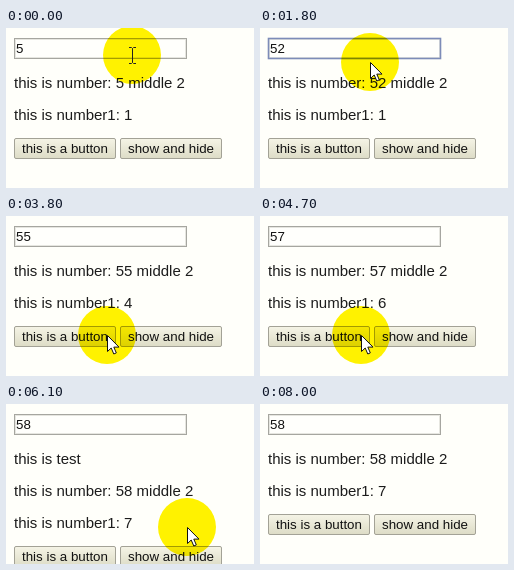
An HTML page for the animation above (8500 ms loop, 248 px wide and 160 px high).

```html
<!DOCTYPE html>
<html lang="en">
<head>
<meta charset="utf-8">
<title>Number demo</title>
<style>
html, body { margin: 0; width: 100%; height: 100%; overflow: hidden; background: #fffffa; }
svg { display: block; width: 248px; height: 160px; font-family: "Liberation Sans", Arial, sans-serif; }
.line { font-size: 15px; fill: #1c1c1c; }
.small { font-size: 13.33px; fill: #111; }
#halo { fill: #fff200; mix-blend-mode: multiply; }
</style>
</head>
<body>
<svg viewBox="0 0 248 160">
  <defs>
    <linearGradient id="face" x1="0" y1="0" x2="0" y2="1">
      <stop offset="0" stop-color="#f5f4e6"/>
      <stop offset="1" stop-color="#dddcc6"/>
    </linearGradient>
    <g id="box">
      <rect x=".5" y=".5" width="101" height="20" rx="1.5" fill="url(#face)" stroke="#a3a296"/>
    </g>
  </defs>
  <rect width="248" height="160" fill="#fffffa"/>

  <rect x="8.5" y="10.5" width="172" height="20" fill="#fffffc" stroke="#a6a6a0"/>
  <rect x="9.5" y="11.5" width="170" height="18" fill="none" stroke="#e6e6e0"/>
  <rect id="focus" x="8.5" y="10.5" width="172" height="20" fill="none" stroke="#7d8cb8" stroke-width="1.6"/>
  <text id="value" class="small" x="10" y="25"></text>
  <rect id="caret" y="13" width="1" height="15" fill="#111"/>

  <text id="test" class="line" x="8" y="60">this is test</text>
  <g id="flow">
    <text id="number" class="line" x="8" y="60"></text>
    <text id="number1" class="line" x="8" y="92"></text>
    <use href="#box" x="8" y="110"/>
    <text class="small" x="16" y="125">this is a button</text>
    <use href="#box" x="114" y="110"/>
    <text class="small" x="122" y="125">show and hide</text>
  </g>

  <g id="pointer">
    <circle id="halo" r="29"/>
    <path id="arrow" d="M.5.5V16.5L4.2 13 6.8 19 9.3 17.9 6.8 12.1H12Z" fill="#fff" stroke="#111"/>
    <path id="beam" d="M-3.5-7.5H-1L0-6.5 1-7.5H3.5M-3.5 8.5H-1L0 7.5 1 8.5H3.5M0-6.5V7.5" fill="none" stroke="#222"/>
  </g>
</svg>
<script>
const LOOP = 8500, STEP = 100;
const $ = id => document.getElementById(id);
const show = (id, on) => $(id).setAttribute("visibility", on ? "visible" : "hidden");
const shift = (id, x, y) => $(id).setAttribute("transform", `translate(${x} ${y})`);
const within = (t, a, b) => t >= a && t < b;

// Pointer stops: time, x, y
const path = [
  [0, 126, 27], [600, 113, 25], [1700, 113, 25], [1800, 110, 34],
  [2400, 101, 119], [5200, 101, 119], [5800, 181, 123],
  [6400, 181, 123], [7000, 183, 146], [7600, 183, 146], [8000, 183, 195]
];
const clicks = [2900, 3300, 3700, 4200, 4600, 5000];

function pointerAt(t) {
  const i = path.findIndex(p => p[0] > t);
  if (i < 0) return path[path.length - 1].slice(1);
  const [t0, x0, y0] = path[i - 1], [t1, x1, y1] = path[i];
  const k = (t - t0) / (t1 - t0), e = k * k * (3 - 2 * k);
  return [x0 + (x1 - x0) * e, y0 + (y1 - y0) * e];
}

function overText(x, y, open) {
  if (x < 182 && within(y, 10, 32)) return true;
  const top = open ? 32 : 0;
  return x < 187 && within(y, 46 + top, 64 + top) ||
         x < 127 && within(y, 78 + top, 96 + top);
}

function draw(t) {
  const typed = t >= 1300;
  const count = clicks.filter(c => t >= c).length;
  const value = typed ? 52 + count : 5;
  const open = within(t, 5900, 7200);
  const focused = within(t, 300, 2900);

  $("value").textContent = value;
  $("number").textContent = `this is number: ${value} middle 2`;
  $("number1").textContent = `this is number1: ${1 + count}`;
  show("focus", focused);
  show("caret", focused && (t - 300) % 1000 < 500);
  $("caret").setAttribute("x", typed ? 25 : 18);
  show("test", open);
  shift("flow", 0, open ? 32 : 0);

  const [x, y] = pointerAt(t), beam = overText(x, y, open);
  shift("halo", x, y);
  shift("arrow", Math.round(x), Math.round(y));
  shift("beam", Math.round(x) + .5, Math.round(y));
  show("halo", t < 8000);
  show("arrow", t < 8000 && !beam);
  show("beam", t < 8000 && beam);
}

const start = performance.now();
function tick() {
  const t = (performance.now() - start) % LOOP;
  draw(Math.floor(t / STEP) * STEP);
  requestAnimationFrame(tick);
}
tick();
</script>
</body>
</html>
```
